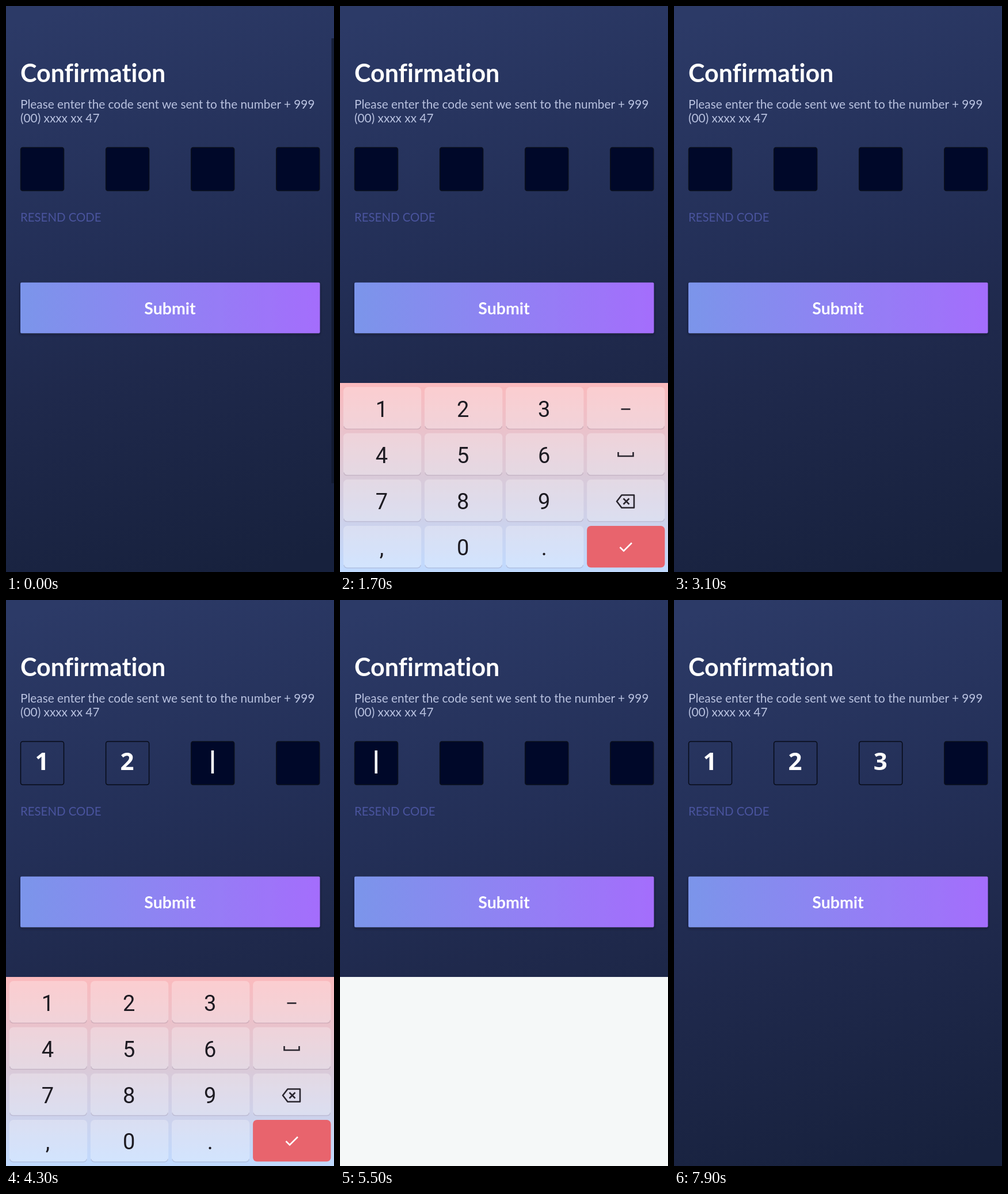
An HTML page that plays this animation: 570x982 px, repeating every 8000 ms.

```html
<!DOCTYPE html>
<html lang="en">
<head>
<meta charset="utf-8">
<title>Confirmation</title>
<style>
  html, body { margin: 0; width: 100%; height: 100%; overflow: hidden; background: #1f2a4c; }
  svg { display: block; width: 100vw; height: 100vh; }
  text { font-family: Lato, "Noto Sans", sans-serif; font-variant-ligatures: none; }
  .title { font-size: 43px; font-weight: 700; fill: #fff; }
  .body { font-size: 20.8px; fill: #b9c2e0; }
  .resend { font-size: 20.4px; fill: #4a549e; }
  .submit { font-size: 28.5px; font-weight: 700; fill: #fff; text-anchor: middle; }
  .digit { font: 600 42px "Noto Sans", "Open Sans", sans-serif; fill: #fff; text-anchor: middle; }
  .box { fill: #000829; stroke: #0b101c; stroke-width: 1.5; }
  .box.filled { fill: none; stroke: #060a16; }
  .key { fill: #fff; fill-opacity: .27; }
  .key.pressed { fill-opacity: .68; }
  .key.enter { fill: #e8646d; fill-opacity: 1; }
  .lip { fill: none; stroke: #7d6880; stroke-opacity: .22; stroke-width: 1.5; }
  .label { font: 400 38px Roboto, Inter, sans-serif; fill: #1d1b22; text-anchor: middle; }
  .icon { fill: none; stroke: #29252e; stroke-width: 2.6; }
</style>
</head>
<body>
<svg viewBox="0 0 570 982" preserveAspectRatio="none">
  <defs>
    <linearGradient id="night" gradientUnits="userSpaceOnUse" x1="160" y1="-10" x2="430" y2="985">
      <stop offset="0" stop-color="#2c3a67"/>
      <stop offset=".4" stop-color="#232f57"/>
      <stop offset=".62" stop-color="#1f294c"/>
      <stop offset="1" stop-color="#17213d"/>
    </linearGradient>
    <linearGradient id="violet">
      <stop offset="0" stop-color="#7b95ea"/>
      <stop offset=".5" stop-color="#9082f3"/>
      <stop offset="1" stop-color="#a46dfc"/>
    </linearGradient>
    <linearGradient id="dawn" x2="0" y2="1">
      <stop offset="0" stop-color="#fbbabd"/>
      <stop offset=".5" stop-color="#d9cad9"/>
      <stop offset="1" stop-color="#c0daff"/>
    </linearGradient>
    <filter id="shadow" x="-5%" y="-20%" width="110%" height="150%">
      <feDropShadow dx="0" dy="2" stdDeviation="2.5" flood-color="#0a1024" flood-opacity=".5"/>
    </filter>
  </defs>

  <rect width="570" height="982" fill="url(#night)"/>
  <rect id="edge" x="565.5" y="56" width="5" height="772" fill="#11182c" opacity=".75"/>

  <text class="title" x="25" y="132">Confirmation</text>
  <text class="body" x="25" y="178">Please enter the code sent we sent to the number + 999</text>
  <text class="body" x="25" y="202">(00) xxxx xx 47</text>
  <g id="boxes"></g>
  <rect id="cursor" x="60.5" y="261" width="4.5" height="40" fill="#fff"/>
  <text class="resend" x="25" y="374">RESEND CODE</text>
  <rect x="25" y="479.700" width="520.5" height="88" rx="2" fill="url(#violet)" filter="url(#shadow)"/>
  <text class="submit" x="285" y="534.500">Submit</text>

  <rect id="panel" y="654" width="570" height="328" fill="#f5f8f8"/>
  <g id="keyboard">
    <rect y="654" width="570" height="328" fill="url(#dawn)"/>
    <g id="keys"></g>
    <path class="icon" d="M488.500 699.500h16"/>
    <path class="icon" d="M483.500 774v7h26v-7"/>
    <path class="icon" stroke-linejoin="round" d="M489.500 848.500h21.500v22h-21.500l-8.500-11z"/>
    <path class="icon" d="M492.500 854.500l10 10m0-10l-10 10"/>
    <path class="icon" style="stroke:#fff" d="M486.500 939l6.500 6.500l14-14"/>
  </g>
</svg>

<script>
const LOOP = 8000;
const TYPE_DELAY = 150;
const BLINK = 500;
const CODE = '123';

// Each visit: keyboard opens, keys are pressed, keyboard hides, boxes clear.
const visits = [
  { open: 800, presses: [], hide: 2400, clear: 2600 },
  { open: 3200, presses: [3600, 3950, 4400], hide: 4900, clear: 5200 },
  { open: 5500, presses: [5900, 6250, 6550], hide: 7200, clear: LOOP }
];

const byId = id => document.getElementById(id);

function add(parent, tag, attrs, content = '') {
  const node = document.createElementNS('http://www.w3.org/2000/svg', tag);
  for (const name in attrs) node.setAttribute(name, attrs[name]);
  node.textContent = content;
  parent.append(node);
  return node;
}

const boxes = [0, 1, 2, 3].map(i => {
  const x = 25.5 + i * 148.1;
  return {
    frame: add(byId('boxes'), 'rect', { class: 'box', x, y: 245.5, width: 75, height: 75, rx: 3.5 }),
    digit: add(byId('boxes'), 'text', { class: 'digit', x: x + 37, y: 294.5 })
  };
});

const keys = [...'123-456_789<,0.!'].map((label, i) => {
  const x = 5.8 + (i % 4) * 141.1;
  const y = 661 + Math.floor(i / 4) * 80.3;
  const isEnter = label === '!';
  const key = add(byId('keys'), 'rect',
    { class: isEnter ? 'key enter' : 'key', x, y, width: 135.4, height: 72.4, rx: 7 });
  if (!isEnter) add(byId('keys'), 'path', { class: 'lip', d: `M${x + 1} ${y + 68}q1 5 6 5h121.4q5 0 6-5` });
  if (i % 4 < 3) add(byId('keys'), 'text', { class: 'label', x: x + 66.7, y: y + 51.5 }, label);
  return key;
});

const clamp = v => Math.min(1, Math.max(0, v));
const show = (node, on) => node.setAttribute('visibility', on ? 'visible' : 'hidden');

function keyboardPose(t, { open, hide }) {
  if (t < open + 50 || t >= hide + 200) return { y: 0, alpha: 0 };
  if (t < hide) {
    const rest = (1 - clamp((t - open - 50) / 200)) ** 2;
    return { y: 40 * rest, alpha: 1 - rest };
  }
  const gone = ((t - hide) / 200) ** 3;
  return { y: 88 * gone, alpha: 1 - gone };
}

function render(t) {
  const visit = visits.find(v => t < v.clear);
  const { open, presses, hide } = visit;
  const typedAt = presses.map(p => p + TYPE_DELAY).filter(p => t >= p);
  const count = typedAt.length;

  boxes.forEach(({ frame, digit }, i) => {
    frame.classList.toggle('filled', i < count);
    digit.textContent = i < count ? CODE[i] : '';
  });

  const since = t - (typedAt[count - 1] ?? open);
  show(byId('cursor'), t >= open && t < hide && since % (2 * BLINK) < BLINK);
  byId('cursor').setAttribute('transform', `translate(${count * 148.1})`);

  keys.slice(0, 3).forEach((key, i) => {
    key.classList.toggle('pressed', t >= presses[i] && t < presses[i] + TYPE_DELAY);
  });

  const pose = keyboardPose(t, visit);
  byId('keyboard').setAttribute('transform', `translate(0 ${pose.y})`);
  byId('keyboard').setAttribute('opacity', pose.alpha);
  show(byId('panel'), t >= open && t < hide);
  show(byId('edge'), t < 100);
}

const start = performance.now();
function tick() {
  render((performance.now() - start) % LOOP);
  requestAnimationFrame(tick);
}
tick();
</script>
</body>
</html>
```
